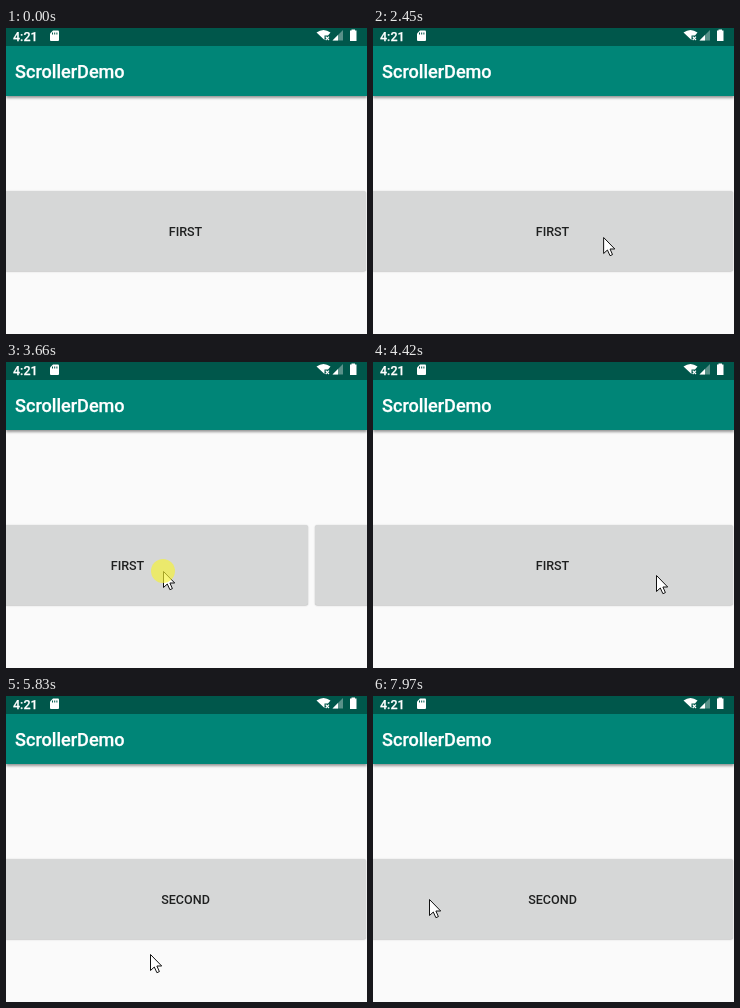
An HTML page for the animation above (8000 ms loop, 361 by 306 pixels).

```html
<!DOCTYPE html>
<html lang="en">
<head>
<meta charset="utf-8">
<title>ScrollerDemo</title>
<style>
  html, body { margin: 0; width: 100%; height: 100%; overflow: hidden; }
  body { background: #fafafa; }
  #stage {
    position: relative; width: 361px; height: 306px; overflow: hidden;
    background: #fafafa; font-family: Roboto, sans-serif; font-weight: 500;
  }
  #stage > * { position: absolute; }
  #status { left: 0; top: 0; width: 361px; height: 18px; background: #00574b; }
  #toolbar {
    left: 0; top: 18px; width: 361px; height: 50px; background: #008577;
    box-shadow: 0 1.5px 2.5px rgba(0, 0, 0, .4);
  }
  #bar { left: 0; top: 0; }
  #bar text { fill: #fff; stroke: #fff; stroke-width: .25px; }
  #pages { left: 0; top: 163px; }
  .button {
    position: absolute; top: 0; width: 362px; height: 80px;
    border-radius: 2px; background: #d6d7d7; color: #1f2020;
    box-shadow: 0 .5px 1.5px rgba(0, 0, 0, .3);
    font-size: 12.57px; line-height: 81px; text-align: center; text-indent: 1px;
  }
  #pointer { left: 0; top: 0; overflow: visible; }
</style>
</head>
<body>
<div id="stage">
  <div id="pages">
    <div class="button" style="left:-2px">FIRST</div>
    <div class="button" style="left:367px">SECOND</div>
  </div>
  <div id="toolbar"></div>
  <div id="status"></div>
  <svg id="bar" width="361" height="70">
    <text x="7" y="13" font-size="12.5">4:21</text>
    <text x="9" y="50" font-size="18.100">ScrollerDemo</text>
    <g fill="#fff">
      <path d="M47 2.5h5q1 0 1 1v8.500q0 1-1 1h-7q-1 0-1-1V5.500z"/>
      <path d="M310.500 4.500Q317.500-.5 324.500 4.500L322 7.500H318.500V12Z"/>
      <path d="M337 2V12.500H326.500Z" opacity=".35"/>
      <path d="M332 7V12.500H326.500Z"/>
      <path d="M345.500 2.500V1.500h3.500v1h1.500V13h-6.500V2.500z"/>
    </g>
    <path d="M46.500 4.500v2M48.700 4.500v2M50.900 4.500v2" stroke="#00574b"/>
    <path d="M319.700 8.700l3.300 3.300m0-3.300l-3.300 3.300" stroke="#fff" stroke-width="1.200"/>
  </svg>
  <svg id="pointer" width="14" height="22">
    <path d="M.5.5V16.500L4.300 13L6.900 18.700L9.400 17.600L6.900 12H11.700Z"
      fill="#fff" stroke="#111" stroke-linejoin="round"/>
    <circle id="press" r="12" fill="#f6f232" fill-opacity=".65"/>
  </svg>
</div>
<script>
  const LOOP = 8000, PAGE = 369, SNAP = 260, ENTER = 540;

  // Pointer moves: start, end, x, y
  const moves = [
    [ENTER, 680, 112, 177], [810, 1370, 265, 211], [1440, 1860, 288, 209],
    [2340, 2590, 149, 209], [2740, 3040, 215, 209], [3040, 3590, 157, 209],
    [3890, 4400, 283, 213], [4590, 5230, 78, 212], [5530, 5830, 144, 258],
    [5890, 6330, 118, 212], [6910, 7370, 212, 212], [7540, 7960, 56, 203]
  ];
  // Finger down, finger up
  const drags = [[3040, 3890], [4590, 5530], [6500, 7540]];

  const [pages, pointer, press] =
    ["pages", "pointer", "press"].map(id => document.getElementById(id));

  const clamp = v => Math.min(1, Math.max(0, v));
  const smooth = u => u * u * (3 - 2 * u);
  const easeOut = u => 1 - (1 - u) ** 3;
  const mix = (a, b, u) => a + (b - a) * u;

  function tip(t) {
    let x = 2, y = 212;
    for (const [start, end, toX, toY] of moves) {
      const u = smooth(clamp((t - start) / (end - start)));
      x = mix(x, toX, u);
      y = mix(y, toY, u);
    }
    return { x, y };
  }

  // Pages follow the pointer while held, then settle on the nearest page.
  function scroll(t) {
    let pos = 0;
    for (const [down, up] of drags) {
      if (t < down) break;
      pos += tip(down).x - tip(Math.min(t, up)).x;
      if (t > up) {
        const rest = Math.round(pos / PAGE) * PAGE;
        pos = mix(pos, rest, easeOut(clamp((t - up) / SNAP)));
      }
    }
    return pos;
  }

  function render(t) {
    const { x, y } = tip(t);
    pointer.style.transform = `translate(${x}px, ${y}px)`;
    pointer.style.visibility = t < ENTER ? "hidden" : "visible";
    press.style.opacity = drags.some(([down, up]) => t >= down && t < up) ? 1 : 0;
    pages.style.transform = `translateX(${-scroll(t)}px)`;
  }

  const origin = performance.now();
  function tick() {
    render((performance.now() - origin) % LOOP);
    requestAnimationFrame(tick);
  }
  tick();
</script>
</body>
</html>
```
